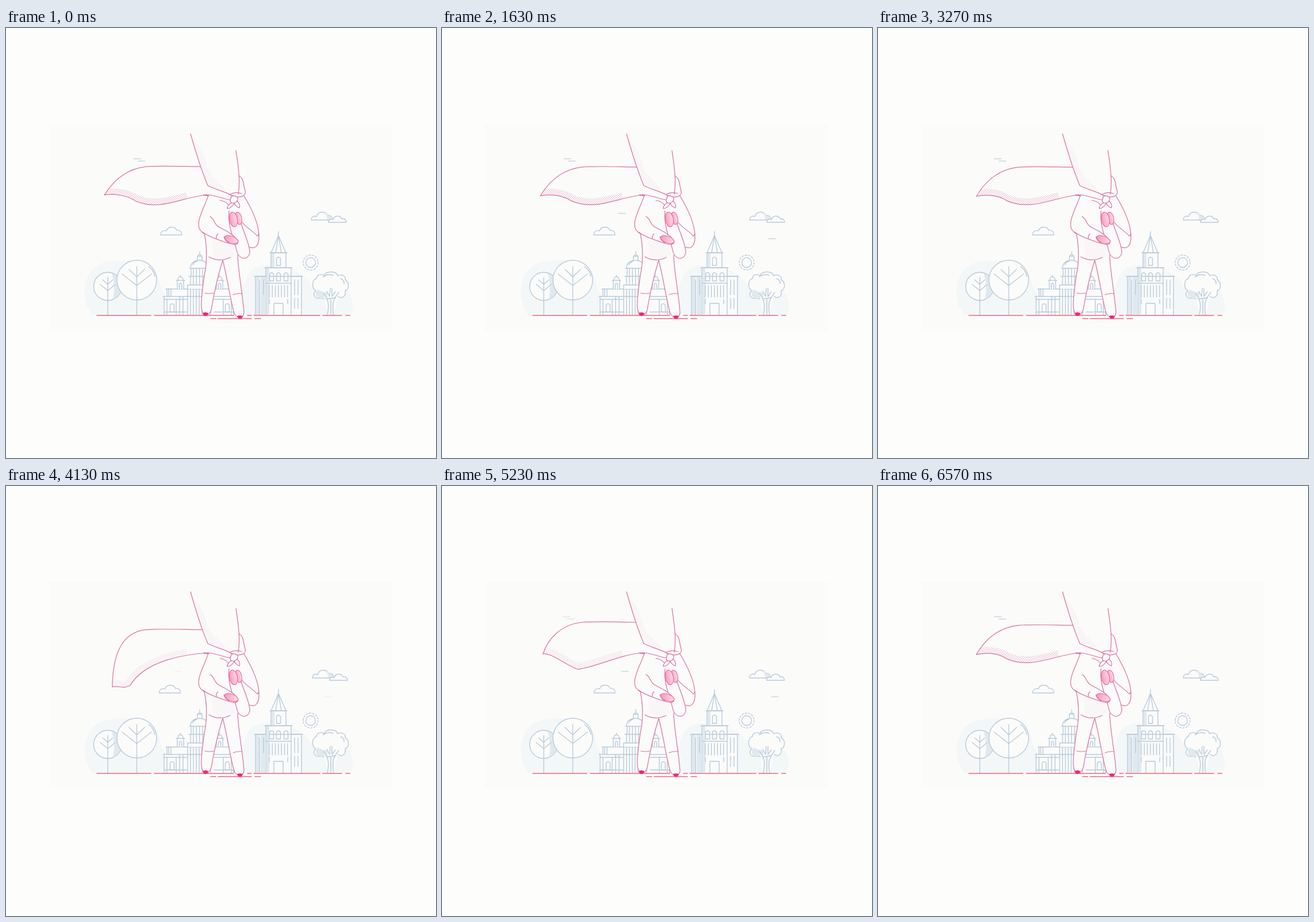
Recreate the animation shown at these times as an HTML page. Size 748 by 748 pixels, loop 6.61 s.

```html
<!DOCTYPE html>
<html lang="en">
<head>
<meta charset="utf-8">
<title>Caped hand in the city</title>
<style>
  html, body { margin: 0; width: 100%; height: 100%; overflow: hidden; background: #fdfdfb; }
  svg { display: block; width: 100vw; height: 100vh; fill: none; stroke-linecap: round; stroke-linejoin: round; }
  .city { stroke: #b9cbda; stroke-width: 1.4; }
  .paper { fill: #fbfbfa; }
  .shade { fill: #e0e9ef; stroke: none; }
  .pink { stroke: #d8719f; stroke-width: 1.2; }
  .nail { fill: url(#polish); stroke: #e9609a; stroke-width: 1; }
  .toe { fill: #ee2a78; stroke: none; }
  .ground { stroke: #f0647f; stroke-width: 1.6; }
  .dots { fill: url(#dots); stroke: none; }
  .bare { stroke: none; }
</style>
</head>
<body>
<svg viewBox="0 0 748 748">
  <defs>
    <pattern id="dots" width="4" height="4" patternUnits="userSpaceOnUse">
      <path d="M1,1h.01M3,3h.01" stroke="#d683ac" stroke-width="1.3"/>
    </pattern>
    <linearGradient id="polish">
      <stop stop-color="#f799bb"/><stop offset="1" stop-color="#fddde8"/>
    </linearGradient>
    <clipPath id="inside"><path id="capeClip"/></clipPath>
    <path id="turret" class="paper" d="M298,454v-15h11v15M296,439h15M299,438c0,-7 9,-7 9,0M303.500,433v-3M301.500,454v-8q2,-4 4,0v8"/>
    <path id="arch" d="M-3.500,8v-12q3.500,-5 7,0v12z"/>
  </defs>

  <path class="paper" d="M75,167h597v360h-597z"/>
  <path fill="#f4f7f8" d="M150,499C128,475 130,410 182,406C215,402 262,400 268,445C272,460 285,470 290,499zM405,499C410,440 420,413 450,413C500,413 520,430 535,450C600,430 612,480 598,499z"/>

  <g class="city">
    <g id="winds"></g>

    <!-- round trees -->
    <circle class="paper" cx="177" cy="449.500" r="24.500"/>
    <path class="shade" d="M184,427a24,24 0 0 1 2,45q5,-24 -2,-45z"/>
    <path d="M177,434V499M164,446l13,11l13,-11M168,438l9,8l9,-8"/>
    <circle class="paper" cx="227.500" cy="438.500" r="34.500"/>
    <path d="M227.500,415V499M202,428l25.500,20l25.500,-20M214,420l13.500,13l13.500,-13M248,415q9,6 11,17"/>

    <!-- domed building -->
    <path class="paper" d="M280,467v-13h111v13M275,499v-32h121v32M273,467h125M278,454h115"/>
    <use href="#turret"/>
    <use href="#turret" x="68"/>
    <path class="paper" d="M316,454v-7h41v7M321,447v-15h31v15M318,432h37M322,432v-14h29v14M319,418h35M321,417C321,400 352,400 352,417M333,404v-7h8v7M333,397q4,-5 8,0M337,393v-4M325,412q2,-5 7,-6"/>
    <path d="M275,494h40M362,494h34M275,472h40M362,472h34"/>
    <use href="#arch" x="289" y="486"/>
    <use href="#arch" x="385" y="486"/>

    <!-- tower -->
    <path class="paper" d="M434,499v-67h80v67M452,499v-82h44v82M461,417v-26h26v26M461,391l13,-30l13,30"/>
    <path class="shade" d="M435,433h6v66h-6zM443,433h9v66h-9zM453,418h5v80h-5zM462,392h5v25h-5z"/>
    <path d="M474,354v7M469,391l5,-30l5,30M459,391h30M450,417h48M432,432h20M496,432h20M452,444h44M466,499v-20h16v20"/>
    <use href="#arch" x="474" y="405"/>
    <use href="#arch" x="462" y="432"/>
    <use href="#arch" x="474" y="432"/>
    <use href="#arch" x="487" y="432"/>
    <path id="bars"/>

    <!-- sun -->
    <circle cx="530" cy="408" r="8.500"/>
    <circle cx="530" cy="408" r="13" stroke-dasharray="3 2.800"/>

    <!-- leafy tree -->
    <path class="paper" d="M546,470C537,472 532,463 539,457C531,453 532,437 540,436C540,429 549,427 553,431C557,422 574,422 577,431C584,427 592,432 590,438C598,442 597,455 590,457C592,466 585,472 578,467Q562,473 546,470z"/>
    <path class="shade" d="M543,455q10,6 16,4v10q-14,4 -18,-1q-6,-8 2,-13z"/>
    <path class="paper" d="M559,499C562,484 562,473 552,462M570,499C567,482 568,473 579,460M558,458l5,9l1,-14M567,453v14l6,-8M565,472v26"/>
    <path d="M552,433q7,-6 17,-3M582,436q7,3 6,9"/>

    <path id="cloudLeft" class="paper" d="M269,360C269,354 274,351 279,353C281,345 294,344 297,352C303,351 306,355 306,360z"/>
    <g id="cloudRight">
      <path class="paper" d="M531,334C531,328 536,326 540,328C543,318 556,318 559,326C565,325 568,329 568,334z"/>
      <path class="shade" d="M548,321q14,0 12,6q8,0 7,6h-9q2,-10 -10,-12z"/>
      <path class="paper" d="M561,338C561,333 565,332 569,333C572,325 582,326 584,332C589,331 592,334 592,338z"/>
    </g>
  </g>

  <path class="ground" d="M158,500H252M258,500H396M420,500h7M431,500H546M551,500H584M591,500h7M356,505.500h9M369,505.500H427M433,505.500h10"/>

  <g class="pink">
    <path id="cape" class="paper bare"/>
    <g clip-path="url(#inside)">
      <path id="band" stroke="url(#dots)" stroke-width="22" stroke-linecap="butt" pathLength="1" stroke-dasharray=".8 1"/>
    </g>
    <path id="capeLine"/>

    <!-- back of the hand and the two walking fingers -->
    <path class="paper bare" d="M352,290C350,302 335,325 335,342C335,350 340,355 345,358C350,380 350,408 345,430C341,460 338,482 341,492C344,502 354,501 357,490C362,460 369,430 377,404C384,430 389,465 396,493C399,506 414,506 414,495C412,465 404,425 403,395C412,406 424,402 424,383C434,384 441,376 440,360C439,338 426,312 414,292z"/>
    <path d="M352,290C350,302 335,325 335,342C335,350 340,355 345,358C350,380 350,408 345,430C341,460 338,482 341,492C344,502 354,501 357,490C362,460 369,430 377,404C384,430 389,465 396,493C399,506 414,506 414,495C412,465 404,425 403,395M353,398Q365,405 378,403Q385,402 390,399M346,461Q353,463 361,461M395,464Q402,461 411,462"/>
    <path class="dots" opacity=".25" d="M358,366L395,379L399,396Q380,402 360,396z"/>
    <path class="toe" d="M342,496q5,-3 10,0q-1,5 -5,5q-4,0 -5,-5zM402,501q5,-2 10,0q-1,5 -5,5q-4,0 -5,-5z"/>

    <!-- folded fingers and thumb -->
    <path class="paper" d="M414,292C426,312 439,338 440,360C441,377 434,386 424,381M409,336C418,348 430,353 437,362Q439,361 440,357"/>
    <path class="paper" d="M388,318C385,345 397,367 401,386C405,405 422,404 424,391C425,378 413,355 408,337"/>
    <ellipse class="nail" cx="404.500" cy="331" rx="5.500" ry="11" transform="rotate(-12 404.500 331)"/>
    <ellipse class="nail" cx="395.500" cy="333" rx="7" ry="13" transform="rotate(-10 395.500 333)"/>
    <path class="paper" d="M355,328C364,333 361,341 370,346C383,353 397,359 403,370C406,376 398,378 389,375C373,370 352,363 342,355"/>
    <path d="M366,366Q365,361 369,358M372,300Q383,301 389,311"/>
    <ellipse class="nail" cx="392" cy="368" rx="12.500" ry="6" transform="rotate(20 392 368)"/>
    <path d="M379,363q2,7 9,11"/>

    <!-- sleeve, collar and knot -->
    <path class="paper bare" d="M321,184C330,216 340,248 351,274C363,281 382,284 393,292L404,289C408,265 404,240 400,213z"/>
    <path class="dots" opacity=".3" d="M326,197Q345,212 350,245Q362,262 384,282Q362,280 352,273Q337,240 326,197z"/>
    <path class="paper" d="M405,257C414,261 412,271 416,283C418,291 411,294 402,294L388,290Q399,284 410,288"/>
    <path class="paper bare" d="M351,274C363,281 382,284 393,292L390,301C375,299 365,290 347,290z"/>
    <path d="M321,184C330,216 340,248 351,274C363,281 382,284 393,292M400,213C404,240 408,265 404,289M390,299C375,297 365,290 348,290"/>
    <path d="M344,290.500L352,291.500" stroke-width="2.200"/>
    <path class="paper" d="M394,303Q385,307 385,314Q392,314 397,305Q400,311 406,313Q408,306 402,301z"/>
    <path class="paper" d="M392,293Q398,290 403,295Q404,302 398,304Q390,306 390,300z"/>
  </g>
</svg>

<script>
const LOOP = 6610, TURN = 2 * Math.PI;
const $ = id => document.getElementById(id);
const set = (id, name, value) => $(id).setAttribute(name, value);

// Evenly spaced upright strokes: windows and columns
const bars = (x, step, count, y, h) =>
  Array.from({ length: count }, (_, i) => `M${x + i * step},${y}v${h}`).join('');

set('bars', 'd',
  bars(326, 5.3, 5, 418, 14) + bars(326, 5.3, 5, 432, 15) +
  bars(283, 4, 2, 454, 13) + bars(316, 5, 9, 454, 45) +
  bars(280, 16, 2, 472, 27) + bars(302, 6, 2, 467, 32) + bars(378, 14, 2, 472, 27) +
  bars(441, 7, 2, 438, 26) + bars(502, 6, 2, 438, 26) + bars(502, 6, 2, 470, 18) +
  bars(458, 5.3, 7, 448, 20) + bars(458, 32, 2, 472, 8) + bars(441, 7, 1, 464, 35));

// A flap wave runs along the cape: each part swings with its own delay
function drawCape(phase) {
  const wave = (mean, swing, peak) => mean + swing * Math.cos(TURN * (phase - peak));
  const fall = wave(0, 1, .45);
  const top = wave(245.5, 8.5, .665);
  const tip = [wave(178, 7, .47), wave(320, 33, .575)];
  const belly = [wave(221, 16, .2), 324 + 24 * fall];
  const near = ([x, y], dx, dy) => [x + dx, y + dy];

  const upper = `M342,${top}C310,${top} 275,${top - 2} 244,${top}
    C${206},${top + 4} ${near(tip, 7 - 6 * fall, 24 - .9 * (tip[1] - top))} ${tip}`;
  const hem = `C${near(tip, 15, -3)} ${near(belly, -16, -1.5 + 9.6 * fall)} ${belly}
    C${near(belly, 34 - 9 * fall, -12 - 32 * fall)} 308,293 352,290`;

  set('cape', 'd', upper + hem);
  set('capeClip', 'd', upper + hem);
  set('capeLine', 'd', upper + hem);
  set('band', 'd', `M${tip}${hem}`);
  set('band', 'opacity', wave(.65, .35, .85));
}

// Wind strokes: start, height, travel per gust and visibility over the gust
const flicker = u => Math.max(0, Math.cos(2 * TURN * u));
const swell = u => Math.sin(Math.PI * u) ** 4;
const winds = [
  [222, 227.5, -20, flicker],
  [230, 231.5, -20, flicker],
  [280, 322.5, 55, swell],
  [541, 366.5, 55, swell]
].map(([x, y, travel, fade]) => {
  const line = document.createElementNS('http://www.w3.org/2000/svg', 'path');
  line.setAttribute('d', 'M0,0h12');
  $('winds').append(line);
  return u => {
    line.setAttribute('transform', `translate(${x + travel * u} ${y})`);
    line.setAttribute('opacity', .8 * fade(u));
  };
});

function draw() {
  const gust = performance.now() % LOOP / LOOP * 2 % 1;
  const drift = (1 - Math.cos(TURN * gust)) / 2;
  drawCape(gust * 2);
  set('cloudLeft', 'transform', `translate(${-5 * drift})`);
  set('cloudRight', 'transform', `translate(${4 * drift})`);
  winds.forEach(blow => blow(gust));
  requestAnimationFrame(draw);
}
draw();
</script>
</body>
</html>
```
